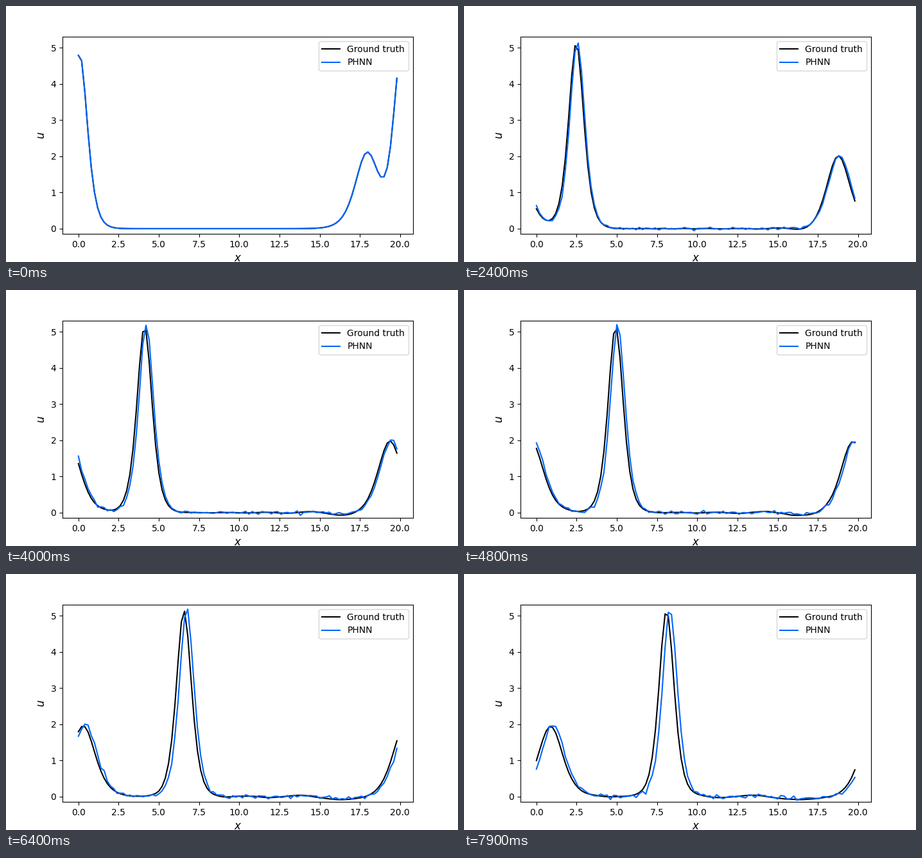
Animation of 704x400 px, one loop 8 s. Source, as a matplotlib script:

```python
import numpy as np
import matplotlib.pyplot as plt
from matplotlib.animation import FuncAnimation

PERIOD, POINTS = 20.0, 100
FRAMES, INTERVAL = 80, 100
DT, SUBSTEPS = 0.01, 8

h = PERIOD / POINTS
x = np.arange(POINTS) * h


def soliton(k, center):
    d = (x - center + PERIOD / 2) % PERIOD - PERIOD / 2
    return 2 * k**2 / np.cosh(k * d) ** 2


def kdv(u, eta, disp):
    """Korteweg-de Vries right-hand side, central differences."""
    uxx = (np.roll(u, -1) - 2 * u + np.roll(u, 1)) / h**2
    flux = eta / 2 * u**2 + disp * uxx
    return -(np.roll(flux, -1) - np.roll(flux, 1)) / (2 * h)


def solve(eta=6.0, disp=1.0, noise=0.0):
    rng = np.random.default_rng(4)
    dt = DT / SUBSTEPS
    u = soliton(1.537, 0.075) + soliton(1.022, 17.953)
    states = [u]
    for _ in range(FRAMES - 1):
        for _ in range(SUBSTEPS):
            k1 = kdv(u, eta, disp)
            k2 = kdv(u + dt / 2 * k1, eta, disp)
            k3 = kdv(u + dt / 2 * k2, eta, disp)
            k4 = kdv(u + dt * k3, eta, disp)
            u = u + dt / 6 * (k1 + 2 * k2 + 2 * k3 + k4)
        kick = rng.normal(size=POINTS)
        u = u + noise * (kick - np.roll(kick, 1))
        states.append(u)
    return states


truth = solve()
model = solve(eta=6.09, disp=0.98, noise=0.0025)

fig, ax = plt.subplots(figsize=(7.04, 4.0), dpi=100)
truth_line, = ax.plot(x, truth[0], color="black", label="Ground truth")
model_line, = ax.plot(x, model[0], color="#0066ff", label="PHNN")
ax.set_xlim(-0.99, 20.79)
ax.set_ylim(-0.143, 5.302)
ax.set_xlabel("$x$", fontsize=12)
ax.set_ylabel("$u$", fontsize=12)
ax.legend(loc="upper right")


def update(i):
    truth_line.set_ydata(truth[i])
    model_line.set_ydata(model[i])
    return truth_line, model_line


anim = FuncAnimation(fig, update, frames=FRAMES, interval=INTERVAL,
                     repeat=True, repeat_delay=0)
plt.show()
```
